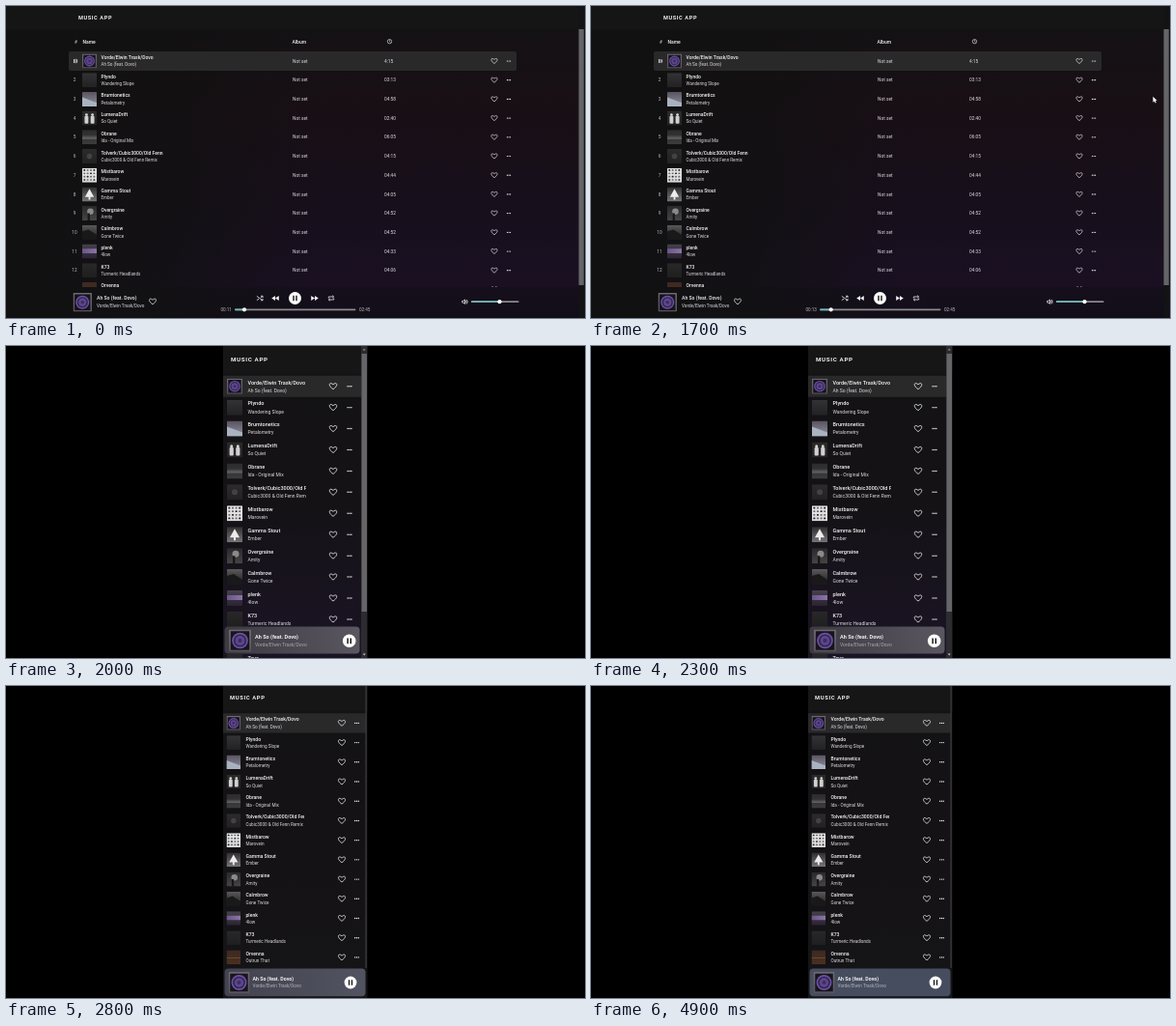
An HTML page with a canvas that plays this animation: 600x323 px, repeating every 5000 ms.

```html
<!DOCTYPE html>
<html lang="en">
<head>
<meta charset="utf-8">
<title>Music app</title>
<style>
html, body { margin: 0; width: 100%; height: 100%; overflow: hidden; background: #000; }
canvas { display: block; width: 600px; height: 323px; }
</style>
</head>
<body>
<canvas id="stage"></canvas>
<script>
const canvas = document.getElementById('stage');
const c = canvas.getContext('2d');
const ratio = Math.max(1, window.devicePixelRatio || 1);
canvas.width = 600 * ratio;
canvas.height = 323 * ratio;

const LOOP = 5000;
const WHITE = '#f2f1f3', SOFT = '#b9b7bb', TEAL = '#6fb5b8';
const SONG = 'Ah So (feat. Dovo)', ARTIST = 'Vorde/Elwin Trask/Dovo';
const tracks = [
  [ARTIST, SONG, '4:15'],
  ['Plyndo', 'Wandering Slope', '03:13'],
  ['Brumtonetics', 'Petalometry', '04:58'],
  ['LumenaDrift', 'So Quiet', '02:40'],
  ['Obrane', 'Ida - Original Mix', '06:05'],
  ['Tolverk/Cubic3000/Old Fenn', 'Cubic3000 & Old Fenn Remix', '04:15'],
  ['Mistbarow', 'Marovein', '04:44'],
  ['Gamma Stout', 'Ember', '04:05'],
  ['Overgraine', 'Amity', '04:52'],
  ['Calmbrow', 'Gone Twice', '04:52'],
  ['plenk', '4low', '04:33'],
  ['K73', 'Turmeric Headlands', '04:06'],
  ['Orvenna', 'Outrun That', '03:48'],
  ['Tova', 'Low Tide', '05:01']
];

// Top and bottom tones of each cover
const tones = [
  ['#6d6973', '#57535d'], ['#333235', '#222123'], ['#5a525f', '#8e93a1'],
  ['#2a2a2b', '#232324'], ['#2c2c2d', '#3c3c3d'], ['#2b2b2c', '#222223'],
  ['#e6e6e6', '#dadada'], ['#2e2e2f', '#767677'], ['#29292a', '#454546'],
  ['#59595a', '#1c1c1d'], ['#45414b', '#2b2333'], ['#282829', '#1f1f20'],
  ['#3d2920', '#4a2f20'], ['#282829', '#1f1f20']
];

const wide = { x: 65, w: 464, y: 57, dy: 19.7, ax: 79, art: 15, tx: 98.5, size: 5, clip: 290, heart: 506, dots: 521, icons: 0.78 };
const tall = { x: 225, w: 143, y: 41.7, dy: 21.93, ax: 229, art: 16, tx: 250.5, size: 5.5, clip: 311, heart: 339, dots: 356, icons: 0.95, hx: 233, hy: 13.5 };
const compact = { x: 225, w: 148, y: 38.4, dy: 20.21, ax: 228.5, art: 14.6, tx: 248.5, size: 5.1, clip: 309, heart: 348, dots: 363.5, icons: 0.9, hx: 232, hy: 12.4 };

function rect(x, y, w, h, fill, r = 0) {
  c.fillStyle = fill;
  c.beginPath();
  c.roundRect(x, y, w, h, r);
  c.fill();
}

function disc(x, y, r, fill) {
  c.fillStyle = fill;
  c.beginPath();
  c.arc(x, y, r, 0, 7);
  c.fill();
}

function blend(x0, y0, x1, y1, ...colors) {
  const g = c.createLinearGradient(x0, y0, x1, y1);
  colors.forEach((color, i) => g.addColorStop(i / (colors.length - 1), color));
  return g;
}

// y is the middle of the capitals
function text(s, x, y, size, color = WHITE, weight = 400, spacing = 0) {
  c.font = `${weight} ${size}px Roboto, sans-serif`;
  c.letterSpacing = spacing + 'px';
  c.fillStyle = color;
  c.fillText(s, x, y + size * 0.35);
}

function icon(path, x, y, scale = 1, fill = false, color = WHITE) {
  c.save();
  c.translate(x, y);
  c.scale(scale, Math.abs(scale));
  c.lineWidth = 0.85;
  c.fillStyle = c.strokeStyle = color;
  const p = new Path2D(path);
  fill ? c.fill(p) : c.stroke(p);
  c.restore();
}

const heart = (x, y, s) => icon('M0 3.2C-7-1.6-3.2-5.4 0-1.9C3.2-5.4 7-1.6 0 3.2Z', x, y, s);
const skip = (x, y, s) => icon('M0-2.6V2.6L-4 0ZM4-2.6V2.6L0 0Z', x, y, s, true);
const shuffle = (x, y, s) => icon('M-3.3-2.2L3 2.2M-3.3 2.2L-1 .7M1-.7L3-2.2M1.2-2.4H3.2V-.5M1.2 2.4H3.2V.5', x, y, s);
const repeat = (x, y, s) => icon('M-3 0V-1.7H2.8M1.4-3.1L2.9-1.7L1.4-.3M3 0V1.7H-2.8M-1.4 3.1L-2.9 1.7L-1.4 .3', x, y, s);

function dots(x, y, s) {
  for (const d of [-2, 0, 2]) disc(x + d * s, y, 0.78 * s, WHITE);
}

function speaker(x, y) {
  icon('M-3-1H-1.6L0-2.5V2.5L-1.6 1H-3Z', x, y, 0.9);
  icon('M1.2-1.3Q2.2 0 1.2 1.3M2.1-2.5Q4 0 2.1 2.5', x, y, 0.9);
}

function pause(x, y, r) {
  disc(x, y, r, '#fff');
  for (const d of [-0.34, 0.12]) rect(x + d * r, y - r * 0.42, r * 0.22, r * 0.84, '#161616');
}

function slider(x, y, w, done, fill) {
  rect(x, y - 0.9, w, 1.8, '#8b898f', 0.9);
  rect(x, y - 0.9, done, 1.8, fill, 0.9);
  disc(x + done, y, 2.1, '#fff');
}

function cover(i, x, y, size) {
  c.save();
  c.translate(x, y);
  c.scale(size / 16, size / 16);
  c.beginPath();
  c.roundRect(0, 0, 16, 16, 0.6);
  c.clip();
  rect(0, 0, 16, 16, blend(0, 0, 0, 16, ...tones[i]));
  if (i === 0) {
    rect(1.3, 1.3, 13.4, 13.4, '#17141b');
    disc(8, 8, 5.8, '#6a50a4');
    disc(8, 8, 4.6, '#33264f');
    disc(8, 8, 3.4, '#5c468f');
    disc(8, 8, 1.5, '#3d3058');
  } else if (i === 2) {
    icon('M0 6L16 12V16H0Z', 0, 0, 1, true, '#a9b3c0');
  } else if (i === 3) {
    for (const d of [2.6, 9.2]) {
      disc(d + 2.1, 4.2, 1.5, '#d6d6d6');
      rect(d, 5.5, 4.2, 8.5, '#d0d0d0', 1);
    }
  } else if (i === 4) {
    rect(0, 6, 16, 4, blend(0, 6, 0, 10, '#3a3a3b', '#68686a'));
  } else if (i === 5) {
    disc(8, 8, 3, '#424243');
  } else if (i === 6) {
    for (let k = 0; k < 16; k++) rect(1.4 + k % 4 * 3.6, 1.4 + (k >> 2) * 3.6, 2, 1.8, k % 3 ? '#666' : '#222', 0.6);
  } else if (i === 7) {
    icon('M8 2L13 11H9V14H7V11H3Z', 0, 0, 1, true, '#ececec');
  } else if (i === 8) {
    disc(9, 6, 3.5, '#8a8a8b');
    rect(6, 8, 2.4, 8, '#19191a');
  } else if (i === 9) {
    icon('M0 7L7 5L16 11V16H0Z', 0, 0, 1, true, '#19191a');
  } else if (i === 10) {
    rect(0, 5, 16, 5, blend(0, 0, 16, 0, '#6b5488', '#8c75a6'));
  } else if (i === 12) {
    rect(0, 8, 16, 0.8, '#76503a');
  }
  c.restore();
}

function equalizer(t) {
  for (let i = 0; i < 3; i++) {
    const h = 3.8 + 0.7 * Math.sin(t / 130 + i * 2);
    rect(70 + i * 1.6, 57 - h / 2, 0.9, h, '#d8d6da');
  }
}

function list(L, t) {
  const isWide = L === wide;
  const half = L.dy / 2 + 0.1;
  rect(L.x, L.y - half, L.w, 2 * half, '#2a292a', isWide ? 2 : 0);
  tracks.forEach(([name, song, length], i) => {
    const y = L.y + i * L.dy;
    cover(i, L.ax, y - L.art / 2, L.art);
    c.save();
    c.beginPath();
    c.rect(0, 0, L.clip, 323);
    c.clip();
    text(name, L.tx, y - L.size * 0.74, L.size, WHITE, 500);
    text(song, L.tx, y + L.size * 0.76, L.size * 0.91, '#dddbdf');
    c.restore();
    heart(L.heart, y, L.icons);
    dots(L.dots, y, L.icons);
    if (!isWide) return;
    if (i) {
      c.textAlign = 'center';
      text(i + 1, 71, y, 4.8, SOFT);
      c.textAlign = 'left';
    }
    text('Not set', 297, y, 4.8, '#dedce0');
    text(length, 392, y, 4.8, '#dedce0');
  });
  if (isWide) equalizer(t);
}

const seconds = t => '00:' + (11 + Math.floor((Math.min(t, 1700) + 700) / 1000));

// The purple glow fades to neutral on the left
function glow(y, h, ...colors) {
  rect(0, y, 600, h, blend(0, y, 0, y + h, ...colors));
  rect(0, y, 320, h, blend(0, 0, 320, 0, '#111111', 'rgba(17,17,17,.75)', 'rgba(17,17,17,0)'));
}

function widePlayer(t) {
  glow(291, 32, '#150f1c', '#120e18');
  cover(0, 69.5, 297, 19.5);
  text(SONG, 94, 302.3, 5.1, WHITE, 500);
  text(ARTIST, 94, 310.4, 4.6, '#dddbdf');
  heart(152, 306, 0.88);
  shuffle(263, 302.5, 0.95);
  skip(279, 302.5, 0.95);
  pause(299.5, 302.5, 6.5);
  skip(320, 302.5, -0.95);
  repeat(337, 302.5, 0.9);
  text(seconds(t), 222.5, 314.3, 4.6, SOFT);
  slider(237, 314.3, 125.5, 10 + t / 1000, TEAL);
  text('02:45', 366, 314.3, 4.6, SOFT);
  speaker(475.5, 306.2);
  slider(482, 306.2, 49.5, 29.5, TEAL);
}

function wideView(t) {
  glow(0, 323, '#131213', '#180f15', '#170f1c', '#1b1025');
  rect(0, 0, 600, 24.5, '#151515');
  text('MUSIC APP', 75, 12, 5.6, WHITE, 700, 0.6);
  text('#', 71, 37, 4.8, SOFT, 500);
  text('Name', 79.5, 37, 5, WHITE, 500);
  text('Album', 296.5, 37, 5, WHITE, 500);
  icon('M2.2 0A2.2 2.2 0 1 1-2.2 0A2.2 2.2 0 1 1 2.2 0M0-1.4V0L1 .6', 397.5, 36.7, 1, false, SOFT);
  list(wide, t);
  widePlayer(t);
  rect(593.5, 0, 6.5, 323, '#131215');
  rect(593.5, 24, 5.3, 265, '#656467');
  if (t >= 100) {
    const left = Math.pow(1 - Math.min(1, (t - 100) / 500), 2);
    icon('M0 0V6L1.4 4.8L2.4 6.8L3.4 6.3L2.4 4.4H4.2Z', 582.4 + 9 * left, 93.7 - 84 * left, 1, true, '#fff');
  }
}

function squeezedPlayer() {
  rect(225, 255, 143, 36, blend(0, 255, 0, 291, 'rgba(35,23,54,0)', 'rgba(35,23,54,.6)'));
  rect(225, 289, 143, 34, '#17131f');
  cover(0, 235, 296, 15.5);
  ['Ah So', '(feat.', 'Dovo)'].forEach((s, i) => text(s, 252.5, 293 + i * 5.4, 5.2, WHITE, 500));
  text('Vorde/Elwin', 252.5, 310, 4.7, SOFT);
  text('Trask/Dovo', 252.5, 315.7, 4.7, SOFT);
  heart(286.5, 304.3, 0.85);
  shuffle(299.5, 300.3, 0.9);
  skip(313.5, 300.3, 0.85);
  pause(328, 300.3, 5.6);
  skip(342, 300.3, -0.85);
  repeat(356, 300.3, 0.9);
  text('00:13', 295, 310.2, 4.3, SOFT);
  slider(308.5, 310.2, 38, 5, WHITE);
  text('02:45', 349.5, 310.2, 4.3, SOFT);
  speaker(366.5, 304.3);
}

function mix(a, b, k) {
  return `rgb(${a.map((v, i) => Math.round(v + (b[i] - v) * k))})`;
}

function cardPlayer(L, t) {
  const k = Math.max(0, Math.min(1, (t - 2300) / 1100));
  const slate = [70, 77, 94];
  const fill = blend(226, 0, 372, 0, mix([62, 58, 66], slate, k), mix([92, 88, 98], slate, k));
  if (L === tall) {
    rect(226.5, 290.5, 140, 28, fill, 4);
    cover(0, 231, 293.5, 23);
    text(SONG, 258, 301.4, 5.5, WHITE, 700);
    text(ARTIST, 258, 309, 5, '#a9a6ae');
    pause(355.7, 305.3, 6.8);
  } else {
    rect(226.5, 292.5, 146, 28.8, fill, 4);
    cover(0, 230.5, 296, 22);
    text(SONG, 255.5, 303.2, 5.2, WHITE, 700);
    text(ARTIST, 255.5, 310.3, 4.7, '#b3b4bd');
    pause(357, 307, 6.4);
  }
}

function narrowView(L, t) {
  const isTall = L === tall;
  rect(0, 0, 600, 323, '#000');
  c.save();
  c.beginPath();
  c.rect(225, 0, 149.5, 323);
  c.clip();
  rect(225, 0, 150, 323, blend(0, 0, 0, 323, '#131214', '#141215', isTall ? '#1b1425' : '#151417'));
  rect(225, 0, 150, L.y - L.dy / 2 - 2, '#161617');
  text('MUSIC APP', L.hx, L.hy, isTall ? 6.2 : 5.8, WHITE, 700, 0.65);
  list(L, t);
  if (t < 2000) squeezedPlayer();
  else cardPlayer(L, t);
  if (isTall) {
    rect(368, 0, 6.5, 323, '#2c2b2e');
    rect(368.5, 8, 5.5, 267, '#656467');
    icon('M-1.5 1L0-1L1.5 1Z', 371.2, 3.5, 1, true, '#8a898c');
    icon('M-1.5-1L0 1L1.5-1Z', 371.2, 319.5, 1, true, '#c4c3c6');
  } else {
    rect(372.4, 0, 1.4, 292, '#3a393d');
  }
  c.restore();
}

const start = performance.now();

function draw() {
  const t = Math.floor((performance.now() - start) % LOOP / 100) * 100;
  c.setTransform(ratio, 0, 0, ratio, 0, 0);
  if (t < 1800) wideView(t);
  else narrowView(t < 2500 ? tall : compact, t);
  requestAnimationFrame(draw);
}
draw();
</script>
</body>
</html>
```
